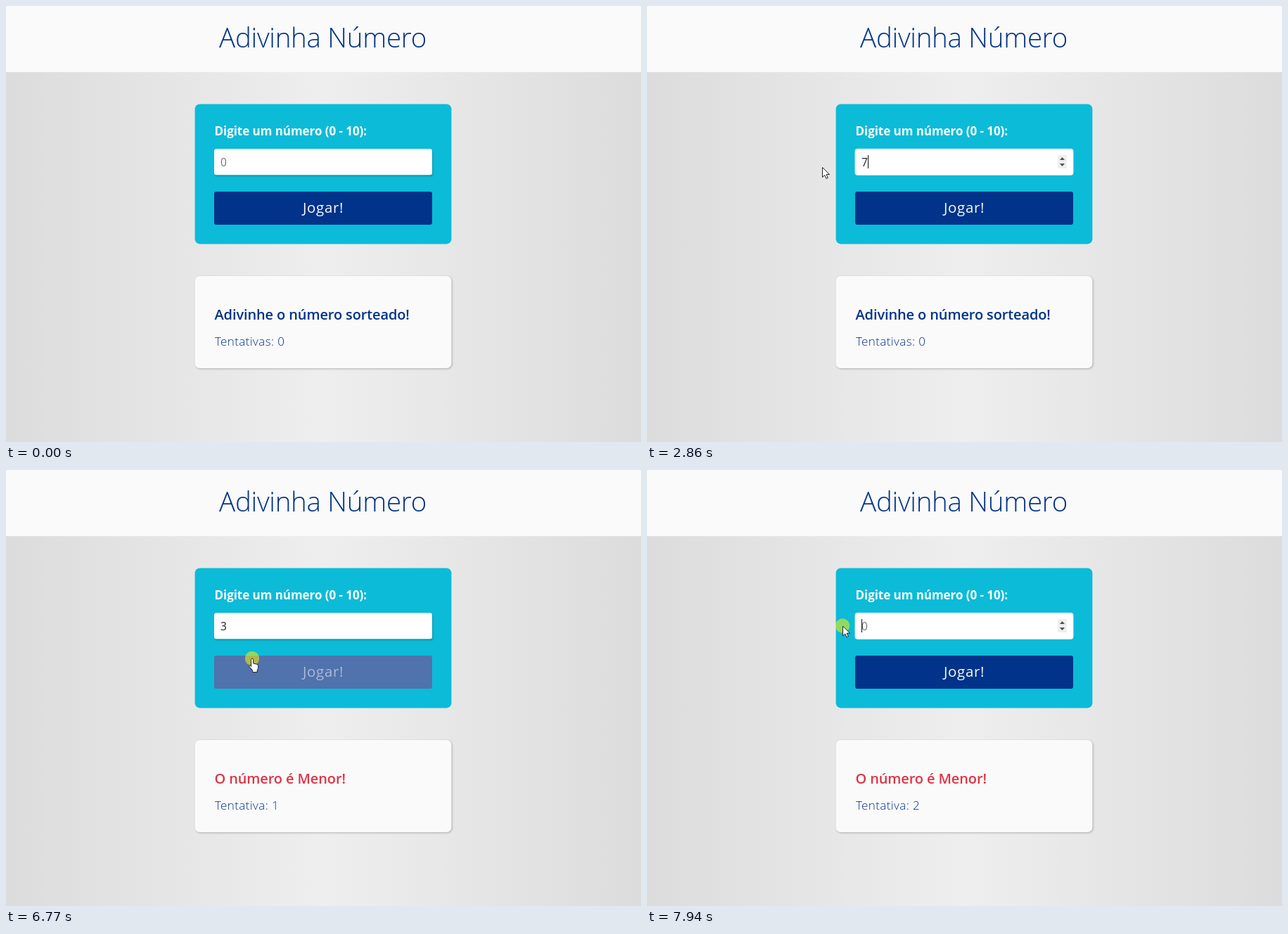
These frames come from a looping animation (903 px wide and 620 px high, 8000 ms). An HTML page:

```html
<!DOCTYPE html>
<html lang="pt-BR">
<head>
<meta charset="utf-8">
<title>Adivinha Número</title>
<style>
html, body { margin: 0; width: 100%; height: 100%; overflow: hidden; }
body { background: linear-gradient(90deg, #dcdcdc, #eee 50%, #dcdcdc); }
svg { display: block; }
text { font-family: "Open Sans", "Noto Sans", sans-serif; fill: #003388; white-space: pre; }
.light { font-weight: 340; }
#panel { fill: #fafafa; filter: drop-shadow(1px 1px 1.5px rgba(0,0,0,.25)); }
#field { fill: #fff; filter: drop-shadow(1px 2px 1px rgba(0,0,0,.2)); }
#field.focus { stroke: #e9eef0; filter: none; }
</style>
</head>
<body>
<svg width="903" height="620" viewBox="0 0 903 620">
  <rect width="903" height="94" fill="#fafafa"/>
  <rect x="268.6" y="139.4" width="364.8" height="199" rx="7" fill="#0cbbd8"/>
  <rect id="field" x="296" y="203.3" width="310" height="37" rx="3"/>
  <rect id="button" x="296" y="264" width="310" height="47" rx="3"/>
  <rect id="panel" x="268.6" y="384" width="364.8" height="131" rx="7"/>
  <text class="light" x="450.5" y="59" font-size="38.5" letter-spacing="-.3" text-anchor="middle">Adivinha Número</text>
  <text x="296.5" y="184" font-size="17" font-weight="700" letter-spacing="-.05" style="fill:#fff">Digite um número (0 - 10):</text>
  <text id="value" x="305" y="227.5" font-size="15.5"></text>
  <text id="play" x="451" y="294" font-size="20.5" font-weight="500" letter-spacing=".6" text-anchor="middle">Jogar!</text>
  <text id="message" x="296.5" y="446" font-size="20" font-weight="600" letter-spacing="-.12"></text>
  <text id="tries" class="light" x="297" y="483" font-size="17" letter-spacing=".4"></text>
  <g id="spinner">
    <rect x="584" y="212" width="13" height="19" fill="#efefef"/>
    <path d="M587 219l3.5-4 3.5 4zM587 224h7l-3.5 4z" fill="#505050"/>
  </g>
  <rect id="caret" y="212" width="1" height="19" fill="#111"/>
  <g id="cursor">
    <circle id="halo" r="10.2" fill="#fff200" fill-opacity=".55"/>
    <path id="beam" d="M-3-6.5h2.2l.8.7.8-.7H3M0-6V6M-3 6.5h2.2l.8-.7.8.7H3" fill="none"/>
    <path id="arrow" d="M.5.5v14l3.3-3.1 2.2 5 2.3-1-2.2-4.8h4.5z" fill="#fff" stroke="#222"/>
    <path id="hand" d="M-1.4 1.5a1.5 1.5 0 0 1 3 0V7l5.2 1.2q1.9.5 1.9 2.4v3l-1.5 3.4v2.5H.6V17l-4.4-5.2q-1-2 .4-2.1t2 1.6z" fill="#fff" stroke="#222"/>
  </g>
</svg>
<script>
const LOOP = 8000, APPEAR = 70, BLINK = 530, FADE = 300;
const el = id => document.getElementById(id);
const show = (id, on) => el(id).style.display = on ? '' : 'none';

// Pointer moves: each glides from the last resting place
const origin = { x: 852, y: 593 };
const moves = [
  { from: 70, to: 830, x: 430, y: 184 },
  { from: 900, to: 1520, x: 356.5, y: 211 },
  { from: 1520, to: 1660, x: 328, y: 217 },
  { from: 1730, to: 1870, x: 249, y: 229 },
  { from: 4720, to: 5300, x: 323.5, y: 219 },
  { from: 5540, to: 5820, x: 300, y: 220.5 },
  { from: 6420, to: 6770, x: 350, y: 268 },
  { from: 6770, to: 6980, x: 352, y: 290 },
  { from: 7290, to: 7450, x: 356, y: 238 },
  { from: 7450, to: 7700, x: 328, y: 219 },
  { from: 7730, to: 7940, x: 278, y: 221.5 }
];

const events = [
  { at: 1640, press: 'field', hold: 200 },
  { at: 2860, key: '7' },
  { at: 3590, submit: true },
  { at: 5290, press: 'field', hold: 550 },
  { at: 6090, key: '3' },
  { at: 6740, press: 'button', hold: 160 },
  { at: 6900, submit: true },
  { at: 7700, press: 'field', hold: 300 }
];

const clamp = u => Math.max(0, Math.min(1, u));
const smooth = u => u * u * (3 - 2 * u);

function pointerAt(t) {
  let { x, y } = origin;
  for (const m of moves) {
    const u = smooth(clamp((t - m.from) / (m.to - m.from)));
    x += (m.x - x) * u;
    y += (m.y - y) * u;
  }
  return { x, y };
}

function targetAt({ x, y }) {
  if (x < 296 || x > 606) return '';
  if (y > 203 && y < 240) return 'field';
  return y > 264 && y < 311 ? 'button' : '';
}

// Times at which the pointer enters or leaves the button
const crossings = [];
for (let t = APPEAR, over = false; t < LOOP; t += 2) {
  const now = targetAt(pointerAt(t)) === 'button';
  if (now !== over) crossings.push({ at: t, goal: +now });
  over = now;
}

// The CSS "ease" curve, solved by bisection
function ease(x) {
  const bez = (p, q, s) => 3 * p * s * (1 - s) ** 2 + 3 * q * s * s * (1 - s) + s ** 3;
  let lo = 0, hi = 1;
  for (let i = 0; i < 20; i++) {
    const mid = (lo + hi) / 2;
    if (bez(.25, .25, mid) < x) lo = mid; else hi = mid;
  }
  return bez(.1, 1, lo);
}

function hoverAt(t) {
  let p = 0;
  crossings.forEach(({ at, goal }, i) => {
    const next = crossings[i + 1];
    const until = next ? Math.min(t, next.at) : t;
    p += (goal - p) * ease(clamp((until - at) / FADE));
  });
  return p;
}

function formAt(t) {
  const form = { focus: false, value: '', tries: 0, blinkStart: 0, pressed: false };
  for (const e of events.filter(e => e.at <= t)) {
    if (e.press) {
      form.focus = e.press === 'field';
      form.pressed = t < e.at + e.hold;
    }
    if (e.key) form.value = e.key;
    if (e.submit) {
      form.value = '';
      form.tries++;
    } else form.blinkStart = e.at;
  }
  return form;
}

const navy = [0, 51, 137], pale = [250, 250, 250];
const mix = (a, b, p) => `rgb(${a.map((v, i) => Math.round(v + (b[i] - v) * p))})`;

function drawPointer(spot, target, pressed) {
  const shapes = { field: 'beam', button: 'hand', '': 'arrow' };
  for (const id of Object.values(shapes)) show(id, id === shapes[target]);
  show('halo', pressed);
  el('beam').setAttribute('stroke', spot.y > 230 ? '#2fbad4' : '#222');
  el('cursor').setAttribute('transform', `translate(${spot.x} ${spot.y})`);
}

function draw(t) {
  const { focus, value, tries, blinkStart, pressed } = formAt(t);
  const spot = pointerAt(t), target = targetAt(spot);
  show('cursor', t >= APPEAR);
  drawPointer(spot, target, pressed);

  el('field').setAttribute('class', focus ? 'focus' : '');
  show('spinner', focus || target === 'field' && spot.y < 236);
  el('value').textContent = value || '0';
  el('value').style.fill = value ? '#222' : '#757575';
  show('caret', focus && Math.floor((t - blinkStart) / BLINK) % 2 === 0);
  el('caret').setAttribute('x', value ? 314 : 305);

  const p = hoverAt(t);
  el('button').style.fill = mix(navy, pale, p);
  el('play').style.fill = mix(pale, navy, p);

  el('message').textContent = tries ? 'O número é Menor!' : 'Adivinhe o número sorteado!';
  el('message').style.fill = tries ? '#dc3545' : '#003388';
  el('tries').textContent = tries ? `Tentativa: ${tries}` : 'Tentativas: 0';
}

const start = performance.now();
function tick() {
  draw((performance.now() - start) % LOOP);
  requestAnimationFrame(tick);
}
tick();
</script>
</body>
</html>
```
